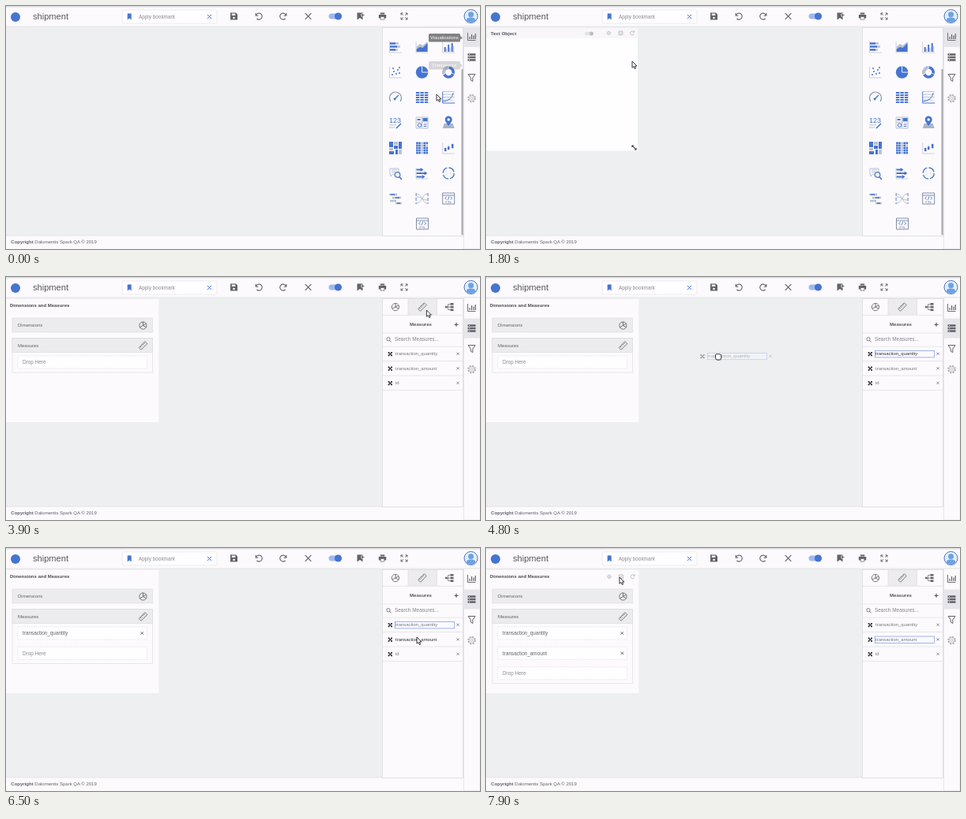
Write an HTML page that moves like this. It is 600 by 308 pixels and loops after 8 s.

```html
<!DOCTYPE html>
<html lang="en">
<head>
<meta charset="utf-8">
<style>
  html, body { margin: 0; width: 100%; height: 100%; overflow: hidden; background: #edeff1; }
  svg { display: block; width: 100vw; height: 100vh; font: 6px "Liberation Sans", Arial, sans-serif; }
</style>
</head>
<body>
<svg id="stage" viewBox="0 0 600 308"></svg>
<script>
const ink = '#62626a', blue = '#4774d0', pale = '#b9c1d1', line = '#dddde2', paper = '#fcfafd', shade = '#ececef';

const stroke = (d, color = ink, w = 1, extra = '') =>
  `<path d="${d}" fill="none" stroke="${color}" stroke-width="${w}" ${extra}/>`;
const fill = (d, color = ink) => `<path d="${d}" fill="${color}"/>`;
const rect = (x, y, w, h, color, extra = '') =>
  `<rect x="${x}" y="${y}" width="${w}" height="${h}" fill="${color}" ${extra}/>`;
const circle = (x, y, r, color, extra = '') => `<circle cx="${x}" cy="${y}" r="${r}" fill="${color}" ${extra}/>`;
const text = (x, y, s, size = 6, color = ink, extra = '') =>
  `<text x="${x}" y="${y}" font-size="${size}" fill="${color}" ${extra}>${s}</text>`;
const at = (x, y, body, scale = 1) => `<g transform="translate(${x} ${y}) scale(${scale})">${body}</g>`;
const layer = (id, body) => `<g id="${id}">${body}</g>`;
const bold = 'font-weight="700"';
const border = color => `stroke="${color}" stroke-width=".7"`;

// Icons, each drawn around its own centre
const axis = stroke('M-7.5-7V7H8', pale, .7);
const cross = (r, color = ink, w = .7) => stroke(`M${-r} ${-r}L${r} ${r}M${r} ${-r}L${-r} ${r}`, color, w);
const grip = cross(2.3, '#333', 1.1) + fill('M-2.6-2.6h1.7v1.7h-1.7zM.9-2.6h1.7v1.7H.9zM-2.6.9h1.7v1.7h-1.7zM.9.9h1.7v1.7H.9z', '#333');
const gear = color => circle(0, 0, 4, 'none', `stroke="${color}" stroke-width="1.8" stroke-dasharray="1.9 1.24"`)
  + circle(0, 0, 3.1, 'none', border(color)) + circle(0, 0, 1.4, 'none', border(color));
const turn = stroke('M-3.6-1A4 4 0 1 1-2.6 3M-3.8-4v3.2h3.2', ink, 1.1);
const ruler = at(0, 0, `<g transform="rotate(-45)">${stroke('M-5.5-2h11v4h-11zM-3.3-2v2M-1.1-2v2M1.1-2v2M3.3-2v2', ink, .8)}</g>`);
const cube = stroke('M0-4.6A4.6 4.6 0 1 1-.1-4.6M0 0V-4.6M0 0L4 2.3M0 0L-4 2.3M0 0L4-2.3', ink, .9);
const tree = stroke('M-5 0h3M-2-3.5V3.5M-2-3.5h3M-2 0h3M-2 3.5h3', ink, .7) + fill('M1-5h4v2.6H1zM1-1.3h4v2.6H1zM1 2.4h4V5H1zM-5.5-1.2h2.5v2.4h-2.5z');
const code = stroke('M-7.5-7h15V7h-15zM-7.5-4h15', '#75829c', .9)
  + stroke('M-2.5-2.3L-4.5-.5l2 1.8M2.5-2.3l2 1.8-2 1.8M.8-2.7L-.8 1.7', blue, .9)
  + text(0, 5.5, 'HTML', 3, '#75829c', 'text-anchor="middle"');
const heat = [...Array(25).keys()].map(i =>
  rect(-7.5 + i % 5 * 3.1, -7.5 + (i / 5 | 0) * 3.1, 2.6, 2.6, i * 7 % 5 > 3 || i === 9 ? pale : blue)).join('');

const charts = [
  axis + stroke('M-7-4.5h7M-7-.5h9M-7 3.5h7', blue, 2.4) + stroke('M0-4.5h4M2-.5h4M0 3.5h3', pale, 2.4),
  axis + fill('M-7 5V0l4-4 4 2 6-5V5z', pale) + fill('M-7 6V3l4-3 4 1 6-6V6z', blue),
  axis + stroke('M-4.5 6V0M0 6V-3M4.5 6V-5', blue, 2) + stroke('M-2.7 6V2M1.8 6V1M6.3 6V-1', pale, 1.3),
  axis + [[-4, 3], [-2, -1], [1, 2], [3, -3], [5, 1], [5, -6], [-3, -5]].map(([x, y]) => circle(x, y, 1, blue)).join(''),
  circle(0, 0, 7.8, blue) + stroke('M0-8V0H8', paper, .9),
  circle(0, 0, 6, 'none', `stroke="${blue}" stroke-width="3.6"`) + stroke('M0-6A6 6 0 0 0-5.5 2.5', pale, 3.6) + stroke('M0-8v4M-8 3.5l4-2M8 3L4 1', paper, .8),
  stroke('M-6 5A7.5 7.5 0 1 1 6 5', '#8795b0', 1.2) + stroke('M-1 2L4-3', blue, 1.5) + circle(-1, 2, 1.4, blue),
  stroke('M-5.5-7V7M0-7V7M5.5-7V7', blue, 4.4, 'stroke-dasharray="2 1"'),
  stroke('M-7-7.5H7.5M-7-4H7.5M-7-.5H7.5M-7 3H5', pale, 1.2) + stroke('M-7.5-7.5V7H8M-7 5Q4 4 6-6', blue, 1),
  text(-8, 0, '123', 9, blue) + stroke('M-8 3h9M-8 6h7', pale, 1) + stroke('M1 7L7 1', blue, 1.6),
  stroke('M-7.5-7h15V7h-15zM-7.5-1h15M0-7V7', pale, 1) + fill('M1-6h6v4H1zM-6-5h4v2h-4z', blue) + circle(-3, 3, 2.3, 'none', `stroke="${blue}"`) + stroke('M2 2h4M2 4.5h4', blue, 1),
  fill('M-7.5 7l2-6h11l2 6z', '#aab5ca') + fill('M0 4C-3 0-4.5-2-4.5-4a4.5 4.5 0 0 1 9 0C4.5-2 3 0 0 4z', blue) + circle(0, -4, 1.7, paper),
  fill('M-8-8h5v7h-5zM-2-3h5v4h-5zM4-8h4v9H4zM-8 4h6v4h-6zM0 2h3v6H0z', blue) + fill('M-2-8h5v4h-5zM-8 0h5v3h-5zM4 2h4v6H4z', pale),
  heat,
  axis + stroke('M-4-1V5M0-4V3M5-6V2', pale, .7) + stroke('M-4 0v4M0-2v4M5-5v5', blue, 2.5),
  stroke('M-7-6H4V1H-3L-6 4V1H-7z', pale, 1) + stroke('M-5-4H2M-5-1.5H1', pale, 1) + circle(2.5, 2, 3.3, paper, `stroke="${blue}" stroke-width="1.3"`) + stroke('M5 4.5L8 8', blue, 1.7),
  axis + stroke('M-7-4.5h6M-7 0H4M-7 4.5h7', blue, 2) + fill('M-2-7l4 2.5-4 2.5zM3-2.5L7 0 3 2.5zM0 2l4 2.5L0 7z', blue),
  circle(0, 0, 7, 'none', `stroke="${blue}" stroke-width="1.3" stroke-dasharray="9 2"`) + stroke('M-5-4Q0 0-5 4M5-4Q0 0 5 4', '#d6dbe6', .8),
  stroke('M-8-5H2M-4-1H7M-7 3H1M0 6H8', pale, 2.5) + stroke('M-6-5h5M0-1h5M2 6h4', blue, 1.7),
  stroke('M-7-6C0-6 0 6 7 6M-7 6C0 6 0-6 7-6M-7-2C0-2 0 2 7 2', pale, 1) + stroke('M-7.5-7V7M7.5-7V7', blue, .9, 'stroke-dasharray="4 2"'),
  code, code
];
const chartGrid = charts.map((c, i) =>
  at(i === 21 ? 527 : 493 + i % 3 * 33.6, 52 + (i / 3 | 0) * 32, c)).join('');

const toolbar = rect(0, 0, 600, 26, paper) + rect(0, 0, 600, 1.6, '#dcdce1') + rect(0, 25.6, 600, .8, '#e2e2e6')
  + circle(12, 14, 6, blue) + text(34, 17, 'shipment', 11.1, '#55555c')
  + rect(147, 5, 120, 17, '#fefdff', `rx="2" ${border('#e6e5ea')}`)
  + fill('M153.7 9.5h5v8l-2.5-2-2.5 2z', blue) + text(168, 16, 'Apply bookmark', 6.4, '#8a8a92') + at(257.5, 13.5, cross(2.5, blue, 1))
  + at(288.5, 13, fill('M-4.5-4.5h7l2 2v7h-9z') + rect(-2.7, -3.4, 4.5, 2.4, paper) + circle(0, 2, 1.3, paper))
  + at(320, 13, turn) + `<g transform="translate(351 13) scale(-1 1)">${turn}</g>` + at(382.5, 13, cross(3.8, ink, 1.2))
  + rect(408.5, 9.5, 16, 7, '#9fb9ef', 'rx="3.5"') + circle(420.5, 13, 4.6, blue)
  + at(448.5, 13, fill('M-4-4.5h7v9L-.5 2-4 4.5z') + stroke('M.5-1.5h5M3-4v5', paper, 2) + stroke('M1-1.5h4M3-3.5v4', ink, 1))
  + at(476.5, 13, fill('M-2.7-4.5h5.4v2h-5.4zM-4.7-2h9.4v4.5h-9.4z') + rect(-2.4, .6, 4.8, 3.5, paper, border(ink)))
  + at(504, 13, stroke('M-4-1.5V-4h2.5M1.5-4H4v2.5M4 1.5V4H1.5M-1.5 4H-4V1.5M-4-4l2.7 2.7M4-4L1.3-1.3M4 4L1.3 1.3M-4 4l2.7-2.7', ink, 1))
  + circle(588.5, 13, 8.5, '#e4eefa', `stroke="${blue}"`) + circle(588.5, 10.7, 3.5, '#6fa3df') + fill('M582.5 18.5q0-4 6-4t6 4q-6 5-12 0z', '#6fa3df');

const footer = rect(0, 291, 600, 17, paper) + rect(0, 290.6, 580, .7, line)
  + text(6.3, 301, `<tspan ${bold}>Copyright</tspan> Dalomentis Spark QA © 2019`);

const sidebar = rect(579.5, 26, 20.5, 282, paper, border(line)) + rect(580, 27, 20, 25, '#e6e6ea', 'id="activeTab"')
  + at(589.5, 39, stroke('M-5-5V4.5H5', ink, .9) + stroke('M-2.5 3V0M0 3V-3M2.5 3V-1.5M4.7 3V-4', ink, 1.2))
  + at(589.5, 65, stroke('M-5-3.5H5M-5 0H5M-5 3.5H5', ink, 2.6) + stroke('M-3.5-3.5h1M-3.5 0h1M-3.5 3.5h1', paper, .8))
  + at(589.5, 91, stroke('M-4.5-4.5h9L1.3 0v4.5l-2.6-1.5V0z', ink, 1)) + at(589.5, 117, gear('#b3b3b9'), 1.1);

const tooltip = (id, y, s, o) => layer(id, `<g opacity="${o}">${rect(535, y, 40, 10.5, '#6c6c70', 'rx="1.5"')}`
  + fill(`M575 ${y + 3}l3 2.2-3 2.2z`, '#6c6c70') + text(555, y + 7.3, s, 5.9, '#fff', 'text-anchor="middle"') + '</g>');

const panel = rect(476.5, 27.5, 102, 264, paper, border('#d8d8de'));
const charting = panel + chartGrid + rect(576.5, 80, 2, 210, '#a5a5ab');

const names = ['transaction_quantity', 'transaction_amount', 'id'];
const rowY = i => 97.3 + i * 18.5;
const editBox = (id, x, y) => rect(x, y, 75, 8.4, '#fbfaff', `id="${id}" ${border('#7898e4')}`);
const fields = panel + rect(509, 28, 36.5, 20, shade) + stroke('M477 48.3H578M509 28V48M545.5 28V48M477 71H578M477 88.2H578', line, .7)
  + at(493, 38, cube) + at(527, 38, ruler) + at(561.5, 38, tree)
  + text(511, 62.2, 'Measures', 6.05, '#55555c', bold) + stroke('M567.5 60.3h5M570 57.8v5', '#444', 1)
  + circle(484, 78.7, 2.2, 'none', border('#555')) + stroke('M485.6 80.4l2 2', '#555', .9) + text(492, 81.3, 'Search Measures...', 6.45, '#85858c')
  + editBox('edit', 492.5, 93.5)
  + names.map((s, i) => at(486.3, rowY(i) + .3, grip) + text(493, rowY(i) + 2, s, 5.95, '#77777e', `id="name${i}"`)
    + at(572, rowY(i), cross(1.6)) + stroke(`M477 ${rowY(i) + 9.2}H578`, line, .7)).join('');

const tools = (x, y, color) => at(x, y, gear(color), .55) + at(x + 15, y, stroke('M-2.3-2.3h4.6v4.6h-4.6zM-1 0h2', color, .9))
  + at(x + 29.5, y, stroke('M2-1.5A2.5 2.5 0 1 0 2.4 1M2.6-3v2H.7', color, .8));
const card = rect(1, 28, 191, 155.5, '#fefdff') + rect(1, 28, 191, 13, '#f8f6f9')
  + text(6, 37, 'Text Object', 6.05, '#55555c', bold)
  + layer('cardTools', rect(125, 32.8, 10, 4.4, '#e2e2e6', 'rx="2.2"') + circle(133.5, 35, 2.5, '#bcbcc3') + tools(155.5, 34.3, '#b5b5bc')
    + stroke('M185.3 177.3l4.4 4.4', '#222', 1) + fill('M184.5 176.5h3l-3 3zM190.5 182.5h-3l3-3z', '#222'));

const slot = y => rect(15, y, 163.5, 16, '#fefdff', `${border('#dfdfe4')} stroke-dasharray="1.6 1.2"`);
const dropped = (id, y, s) => layer(id, slot(y) + text(21, y + 10.2, s, 6.4) + at(172.3, y + 8, cross(1.8, '#444', .8)));
const setup = rect(0, 28, 193.3, 156, paper) + text(5, 38.2, 'Dimensions and Measures', 5.97, '#4c4c53', bold)
  + rect(8, 52, 177.5, 18, shade, border(line)) + text(15, 63, 'Dimensions') + at(173.5, 61.5, cube)
  + rect(8, 77.5, 177.5, 43.5, paper, `id="bin" ${border(line)}`) + rect(8, 77.5, 177.5, 18, shade, border(line))
  + text(15, 88.7, 'Measures') + at(173.5, 87, ruler)
  + layer('empty', slot(100) + text(21, 110.2, 'Drop Here', 6.4, '#8b8b92'))
  + dropped('drop0', 100, names[0]) + dropped('drop1', 125.4, names[1]) + layer('setupTools', tools(156, 36.3, '#b0b0b6'));

const status = rect(-1, 298, 198, 12, '#faf8fb', border('#c9c9ce')) + text(0, 305.4, 'ocalhost:8002', 7.05, '#55555b');
const ghost = at(-6.5, .3, grip) + rect(0, -4, 75, 8.4, '#fbfaff', border('#7898e4'))
  + text(.5, 2, '', 5.95, '#55555c', 'id="ghostName"') + at(79.5, 0, cross(1.6));
const arrow = `<path d="M0 0V8.2L1.9 6.5 3.3 9.5 4.7 8.9 3.4 6H6z" fill="#fff" stroke="#222" stroke-width=".9"/>`;
const fist = `<path d="M-3.5 0V-2.5Q-2.5-4-1.4-3Q-.3-4.2.7-3Q2-4 2.6-2.6Q4-3 3.8-1V1.5L2.6 4H-2L-3.8 1.5z" fill="#fff" stroke="#222" stroke-width="1"/>`;

stage.innerHTML = toolbar + footer + layer('card', card) + layer('setup', setup)
  + layer('charting', charting) + layer('fields', fields) + sidebar
  + tooltip('tip0', 35, 'Visualizations', .85) + tooltip('tip1', 70, 'Datasource', .25)
  + layer('status', status) + layer('ghost', ghost) + layer('arrow', arrow) + layer('fist', fist);

const el = id => document.getElementById(id);
const show = (id, on) => el(id).setAttribute('opacity', +on);
const move = (id, [x, y]) => el(id).setAttribute('transform', `translate(${x} ${y})`);

// Keys are [time, x, y]
const pointer = [[100, 545, 112], [800, 556, 241], [1200, 556, 241], [1700, 187, 72], [1800, 185, 70], [2200, 154, 32],
  [2500, 156, 33], [3300, 539, 36], [3800, 535, 36], [4300, 510, 94], [4600, 506, 95], [4700, 505, 97], [4800, 294, 101],
  [5500, 85, 106], [5700, 82, 103], [5900, 82, 103], [6400, 523, 114], [6500, 520, 113], [6800, 505, 114],
  [6900, 505, 116], [7300, 85, 132], [7400, 85, 130], [7800, 169, 38], [7900, 169, 37]];
const carry = [[4700, 493, 97], [4800, 280.5, 100.3], [5500, 53.5, 105.8], [6800, 493, 116], [6900, 493, 116], [7300, 53.5, 132]];

function follow(keys, t) {
  const i = keys.findIndex(k => k[0] > t);
  if (i === 0) return keys[0].slice(1);
  if (i < 0) return keys.at(-1).slice(1);
  const [a, b] = [keys[i - 1], keys[i]];
  let p = (t - a[0]) / (b[0] - a[0]);
  p *= p * (3 - 2 * p);
  return [1, 2].map(n => a[n] + (b[n] - a[n]) * p);
}
const between = (t, a, b) => t >= a && t < b;
const ramp = (t, a, b) => Math.min(1, Math.max(0, (t - a) / (b - a)));

function draw(t) {
  const mouse = t >= 2500 && t < 3300
    ? (t < 2900 ? follow([[2500, 156, 33], [2900, 414, 85]], t) : follow([[2900, 414, 85], [3300, 539, 36]], t))
    : follow(pointer, t);
  const first = between(t, 4700, 5700), second = between(t, 6900, 7300), dragging = first || second;
  const count = (t >= 5700) + (t >= 7300), open = t >= 2300;

  show('tip0', 1 - ramp(t, 0, 300));
  show('tip1', 1 - ramp(t, 0, 200));
  show('status', between(t, 300, 1300) || between(t, 2200, 3000));
  show('card', between(t, 1100, 2600));
  show('cardTools', between(t, 1500, 2600));
  show('setup', ramp(t, 2200, 2500));
  show('setupTools', t >= 7600);
  show('charting', !open);
  show('fields', open);
  el('activeTab').setAttribute('y', open ? 52.5 : 27);

  el('bin').setAttribute('height', 43.5 + count * 25.4);
  move('empty', [0, count * 25.4]);
  show('drop0', count > 0);
  show('drop1', count > 1);

  const hover = between(t, 4200, 5800) ? 0 : between(t, 6400, 7300) ? 1 : -1;
  names.forEach((_, i) => el('name' + i).setAttribute('fill', i === hover ? '#2c2c30' : '#77777e'));
  show('edit', t >= 4300);
  el('edit').setAttribute('y', t < 6800 ? 93.5 : 112);

  el('ghostName').textContent = names[+second];
  show('ghost', dragging && (first ? .4 + .6 * ramp(t, 5000, 5500) : .4 + .6 * ramp(t, 7000, 7200)));
  move('ghost', follow(carry, t));
  show('arrow', !dragging);
  show('fist', dragging);
  move('arrow', mouse);
  move('fist', mouse);
}

function tick(now) {
  draw(Math.floor(now % 8000 / 100) * 100);
  requestAnimationFrame(tick);
}
tick(performance.now());
</script>
</body>
</html>
```
